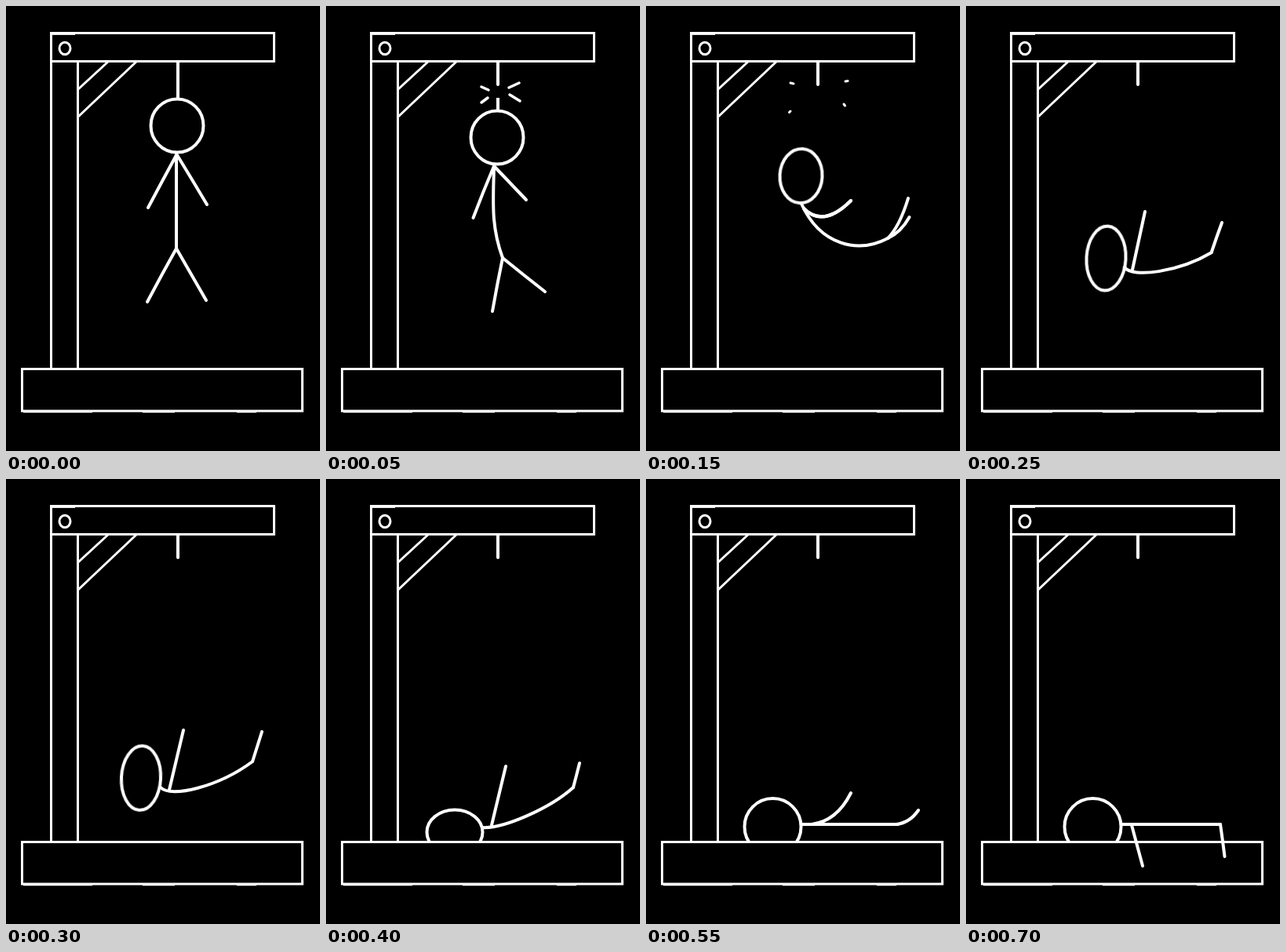
An HTML page without scripts for the animation above (750 ms loop, 400 px wide and 567 px high).

```html
<!DOCTYPE html>
<html lang="en">
<head>
<meta charset="utf-8">
<title>Hangman drop</title>
<style>
html, body { margin: 0; width: 100%; height: 100%; overflow: hidden; background: #000; }
svg { display: block; width: 400px; height: 567px; }
svg * { fill: none; stroke: #fff; }
.wood { stroke-width: 3; }
.solid { fill: #000; }
.thin { stroke-width: 1.2; }
.man { stroke-width: 4; stroke-linecap: round; }

/* Fifteen held poses of 50 ms; steps(n) fills in the evenly spaced ones. */
.move { animation: 750ms steps(1) infinite; }
.head { animation-name: head; transform-box: fill-box; transform-origin: center; }
.rope { animation-name: rope; stroke-linecap: butt; }
.snap { animation-name: snap; stroke-width: 3.5; }
.spine { animation-name: spine; }
.arm { animation-name: arm; }
.leg { animation-name: leg; }
.back-arm { animation-name: back-arm; }
.back-leg { animation-name: back-leg; }

@keyframes head {
  0% { cx: 218px; cy: 152.5px; rx: 33.5px; ry: 34px; transform: rotate(0deg); }
  6.666% { cx: 218px; cy: 167.5px; rx: 33.5px; ry: 34px; transform: rotate(0deg); }
  13.333% { cx: 209px; cy: 190px; rx: 30.5px; ry: 34px; transform: rotate(2deg); }
  20% { cx: 197.5px; cy: 216.5px; rx: 27px; ry: 34.5px; transform: rotate(3deg); animation-timing-function: steps(2); }
  33.333% { cx: 178.5px; cy: 321.5px; rx: 25px; ry: 41px; transform: rotate(3deg); }
  40% { cx: 172px; cy: 381px; rx: 25px; ry: 41px; transform: rotate(3deg); }
  46.666% { cx: 167px; cy: 452px; rx: 48px; ry: 21px; transform: rotate(0deg); }
  53.333% { cx: 164px; cy: 450px; rx: 35.5px; ry: 28.5px; transform: rotate(0deg); animation-timing-function: steps(3); }
  73.333%, 100% { cx: 161.5px; cy: 443px; rx: 36px; ry: 36px; transform: rotate(0deg); }
}
@keyframes rope {
  0% { d: path("M219 100V118"); opacity: 1; }
  6.666% { d: path("M219 117V133"); opacity: 1; }
  13.333%, 100% { d: path("M219 117V133"); opacity: 0; }
}
@keyframes snap {
  0% { opacity: 0; }
  6.666% { opacity: 1; d: path("M198 103L207 107M233 104L246 98M198 123L206 117M234 113L247 121"); animation-timing-function: steps(2); }
  20% { opacity: 1; d: path("M184 98L188 99M254 96L257 95.5M182.5 135.5L184 134M252 125L253.5 127"); stroke-width: 3; animation-timing-function: steps(1); }
  26.666%, 100% { opacity: 0; }
}
@keyframes spine {
  0% { d: path("M217 189C217 230 217 270 217 309"); }
  6.666% { d: path("M214 204C213 250 210 280 225 321"); }
  13.333% { d: path("M206 225C208 270 225 305 263 316"); }
  20% { d: path("M198 252C222 305 270 316 308 296"); animation-timing-function: steps(2); }
  33.333% { d: path("M202 333C212 347 271 339 313 314"); }
  40% { d: path("M197 393C210 407 271 392 314 360"); }
  46.666% { d: path("M214 445C228 446 284 412 315 378"); }
  53.333% { d: path("M199 444C225 446 285 420 315 393"); animation-timing-function: steps(3); }
  73.333% { d: path("M198 440C240 440 282 440 321 440"); }
  80%, 100% { d: path("M198 440C240 440 282 440 324 440"); }
}
@keyframes arm {
  0% { d: path("M218 190Q237 221 256 253"); }
  6.666% { d: path("M214 204Q234 225 255 247"); }
  13.333% { d: path("M206 227Q231 255 261 256"); }
  20% { d: path("M201 258Q226 283 261 248"); animation-timing-function: steps(2); }
  33.333% { d: path("M212 336Q220 299 228 262"); }
  40% { d: path("M208 396Q217 358 226 320"); }
  46.666% { d: path("M219 443Q226 402 230 358"); }
  53.333% { d: path("M211 441Q220 404 229 366"); animation-timing-function: steps(3); }
  73.333% { d: path("M211 440Q243 436 261 400"); }
  80% { d: path("M211 440Q244 441 266 431"); }
  86.666% { d: path("M211 441Q234 456 252 475"); }
  93.333%, 100% { d: path("M211 441Q218 467 225 493"); }
}
@keyframes leg {
  0% { d: path("M217 309Q236 342 255 375"); }
  6.666% { d: path("M225 321Q252 343 279 364"); }
  13.333% { d: path("M263 316Q295 321 319 314"); }
  20% { d: path("M308 296Q323 281 334 245"); animation-timing-function: steps(2); }
  33.333% { d: path("M313 313Q319 295 326 276"); }
  40% { d: path("M314 360Q320 341 326 322"); }
  46.666% { d: path("M315 378Q320 359 325 340"); }
  53.333% { d: path("M315 393Q319 378 323 362"); animation-timing-function: steps(3); }
  73.333% { d: path("M319 440Q336 438 347 422"); }
  80% { d: path("M324 440Q346 443 364 439"); }
  86.666% { d: path("M324 440Q339 452 352 467"); }
  93.333%, 100% { d: path("M324 440Q327 461 329.5 481"); }
}
@keyframes back-arm {
  0% { d: path("M217 190Q199 223 181 257"); opacity: 1; }
  6.666% { d: path("M214 204Q200 237 187.5 270"); }
  13.333% { d: path("M206 227Q214 265 234 279"); }
  20% { d: path("M201 258Q226 283 261 248"); }
  26.666%, 100% { d: path("M201 258Q226 283 261 248"); opacity: 0; }
}
@keyframes back-leg {
  0% { d: path("M217 309Q198 343 180 377"); opacity: 1; }
  6.666% { d: path("M225 321Q218 355 212 389"); }
  13.333% { d: path("M263 316Q285 337 297 358"); }
  20% { d: path("M308 296Q325 288 335.5 269"); animation-timing-function: steps(2); }
  33.333%, 100% { d: path("M313 313Q319 295 326 276"); opacity: 0; }
}
</style>
</head>
<body>
<svg viewBox="0 0 400 567">
  <g class="wood">
    <path d="M57.5 70V462M91.5 70V462M92 106L130 71M92 141L166 71"/>
    <rect x="57.5" y="34.5" width="284" height="36"/>
    <ellipse cx="75" cy="54" rx="7" ry="7.7"/>
    <path class="thin" d="M58 36.3H88"/>
  </g>
  <path class="man" stroke-linecap="butt" d="M219 71V100"/>
  <g class="man">
    <path class="move rope"/>
    <path class="move snap"/>
    <ellipse class="move head"/>
  </g>
  <!-- The platform hides the bottom of the landed head. -->
  <g class="wood">
    <rect class="solid" x="20.5" y="462.5" width="357" height="53.5"/>
    <path class="thin" d="M22 517.6H110M174 517.6H215M294 517.6H319"/>
  </g>
  <g class="man">
    <path class="move spine"/>
    <path class="move back-arm"/>
    <path class="move arm"/>
    <path class="move back-leg"/>
    <path class="move leg"/>
  </g>
</svg>
</body>
</html>
```
